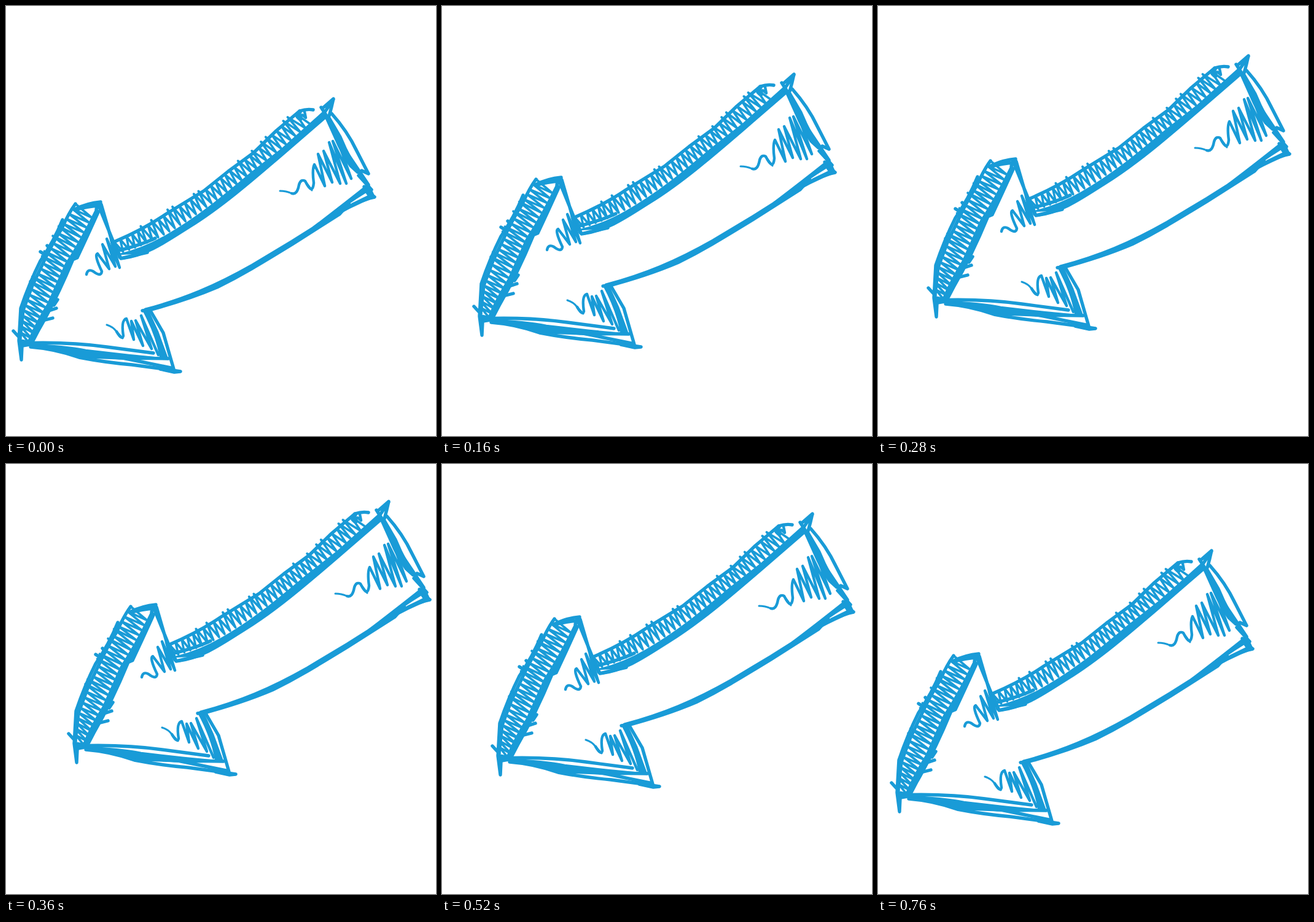
Write an HTML page that moves like this. It is 700 px wide and 700 px high and loops after 0.8 s.

```html
<!DOCTYPE html>
<html lang="en">
<head>
<meta charset="utf-8">
<title>Sketched arrow</title>
<style>
  html, body { margin: 0; width: 100%; height: 100%; overflow: hidden; background: #fff; }
  svg { display: block; width: 100%; height: 100%; }
  path { fill: none; stroke: #199bd7; stroke-width: 5.4; stroke-linecap: round; stroke-linejoin: round; }
  .solid path { fill: #199bd7; stroke-width: 2.4; }
  .scribble path { stroke-width: 4.4; }
  .hatch path { stroke-width: 3.7; }
  path.light { stroke-width: 3; }
</style>
</head>
<body>
<svg viewBox="0 0 700 700">
  <g id="arrow">
    <g class="solid">
      <!-- shaft front edge -->
      <path d="M186 404C215 397 238 387 262 373C315 343 358 306 400 271L450 232L516 173L524 179L450 243C400 286 350 329 300 360C262 384 230 407 190 412Q205 405 222 402Z"/>
      <!-- shaft lower edge -->
      <path d="M226 493C290 476 340 455 400 421L465 382Q530 341 560 322L544 340L467 389C413 422 385 439 345 459C305 476 270 487 228 498Z"/>
      <path d="M500 360Q550 322 590 290L600 311Q560 326 515 354L550 329Q575 316 590 309L586 303Q555 322 520 349Z"/>
      <!-- head front edge -->
      <path d="M147 330L152 335Q134 375 117 411L110 414Q84 477 54 529L42 552L24 555L22 543L36 546Q48 517 68 485L97 420Q122 382 147 330Z"/>
      <!-- tail and base shading -->
      <path d="M519 179L527 181L545 212Q553 232 564 252L580 275L572 272L560 261Q550 247 541 228Z"/>
      <path d="M40 551Q95 553 130 560L200 568L262 574Q200 576 178 574L125 572Q90 561 40 555Z"/>
      <path d="M223 495L232 497L247 530L263 574L251 571Q245 536 223 495Z"/>
    </g>
    <g>
      <!-- shaft -->
      <path id="shaftBack" d="M176 384Q225 363 260 339L322 301L362 269L403 239L440 203L478 171"/>
      <path d="M478 171Q490 167 500 169M480 171L474 180"/>
      <path d="M513 165L522 179M517 165L533 151L530 164L526 179M516 177L533 152"/>
      <path d="M530 175Q556 204 571 236L590 273L579 268M523 181Q538 210 553 236L590 291"/>
      <path d="M574 276L595 299L583 294M588 291L592 305L600 311Q585 314 565 323"/>
      <path d="M176 384L187 411L230 401M180 399Q220 389 243 378"/>
      <!-- head -->
      <path id="headBack" d="M113 322Q102 337 91 362Q75 387 62 415L43 455L28 495L23 540"/>
      <path d="M92 348Q78 383 56 415Q38 451 24 492L21 545L25 576L26 555M12 529L23 541"/>
      <path d="M112 331Q132 321 154 319L153 325Q132 326 112 332M150 323L185 409M155 323L171 378L179 411M147 331L149 324"/>
      <path d="M56 400L65 406M67 390L72 396M84 478L78 487M82 492L70 496M76 508L64 511"/>
      <!-- base -->
      <path d="M22 549Q100 546 164 555L240 565M40 555Q80 558 119 572Q160 580 205 584L250 590L284 595L274 596L251 591"/>
      <path d="M190 573L268 589M200 573L264 574M222 496L237 494M235 496L256 532L273 591"/>
    </g>
    <g class="scribble">
      <path class="light" d="M446 301Q456 301 465 305Q474 308 477 291Q480 281 487 285L498 300"/>
      <path d="M465 305Q474 308 477 291Q480 281 487 285Q499 309 501 288Q498 266 502 258L519 293L508 241L531 287L517 236L544 289L526 222L554 289L532 220L562 281L538 213"/>
      <path d="M131 437Q133 427 142 432Q155 442 156 432Q143 405 149 403L168 428L157 388L178 424L164 379L185 426L171 380"/>
      <path class="light" d="M164 519Q174 522 180 530L190 541"/>
      <path d="M180 530Q189 545 191 537Q187 511 196 509L208 543L204 513L223 553L211 512L237 558L220 504L248 568"/>
      <path d="M474 181Q482 190 480 180Q480 174 488 182L486 172"/>
    </g>
    <g class="hatch" id="hatch"></g>
  </g>
</svg>
<script>
const arrow = document.getElementById("arrow");
const hatch = document.getElementById("hatch");

function makePath(d) {
  const path = document.createElementNS("http://www.w3.org/2000/svg", "path");
  path.setAttribute("d", d);
  return path;
}

function noise(i) {
  const v = Math.sin(i * 127.1) * 43758.5;
  return v - Math.floor(v);
}

function pointOn(path, part) {
  return path.getPointAtLength(path.getTotalLength() * Math.min(1, part));
}

// Zigzag between two edges; some teeth overshoot the back edge.
function fillBetween(back, front, teeth, skew) {
  const points = [];
  for (let i = 0; i < teeth; i++) {
    const s = i / teeth;
    const a = pointOn(back, s + noise(i) * 0.006);
    const b = pointOn(front, s + skew);
    const over = noise(i + 50) > 0.8 ? 0.18 : 0;
    points.push([a.x + (a.x - b.x) * over, a.y + (a.y - b.y) * over], [b.x, b.y]);
  }
  hatch.append(makePath("M" + points.join("L")));
}

fillBetween(document.getElementById("shaftBack"),
  makePath("M184 402Q240 385 290 352Q360 304 400 272L498 190"), 37, 0.018);
fillBetween(document.getElementById("headBack"),
  makePath("M144 336L100 418L38 549"), 26, 0.04);

const STEP = 40, STEPS = 20, STRIDE = 10;

function draw() {
  const step = Math.floor(performance.now() / STEP) % STEPS;
  const shift = STRIDE * Math.min(step, STEPS - step);
  arrow.setAttribute("transform", `translate(${shift} ${-shift})`);
  requestAnimationFrame(draw);
}
draw();
</script>
</body>
</html>
```
